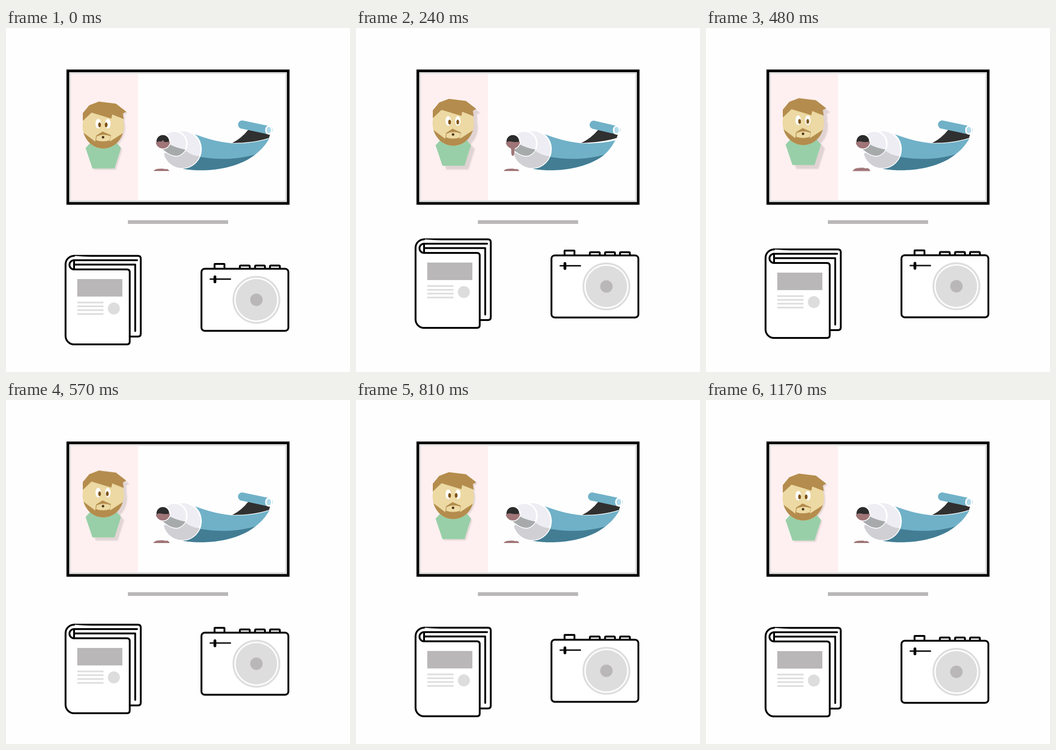
These frames come from a looping animation (748x748 px, 1.2 s). An HTML page without scripts:

```html
<!DOCTYPE html>
<html lang="en">
<head>
<meta charset="utf-8">
<title>Screen, book and camera</title>
<style>
  html, body { margin: 0; width: 100%; height: 100%; overflow: hidden; background: #fefefe; }
  svg { display: block; width: 100%; height: 100%; }

  .ink { fill: #fff; stroke: #000; stroke-width: 4; stroke-linecap: round; stroke-linejoin: round; }
  .line { fill: none; }
  .mid { fill: #b9b7b7; }
  .pale { fill: #dedddd; }
  .edge { stroke: #fff; stroke-width: 3.5; }
  .hair { fill: #b48c4d; }
  .skin { fill: #ecd9a3; }
  .paste { fill: #a07577; }

  .hop, .bob, .cast, .look, .tail, .dark, .roll, .cap, .drop, .neck, .splat {
    animation: 1.2s linear infinite;
  }
  .hop { animation-name: hop; }
  .late { animation-delay: .12s; animation-fill-mode: backwards; }
  .bob { animation-name: bob; }
  .cast { animation-name: cast; }
  .look { animation-name: look; }
  .tail { animation-name: tail; }
  .dark { animation-name: dark; }
  .roll { animation-name: roll; }
  .cap { animation-name: cap; }
  .drop { animation-name: drop; transform-box: fill-box; transform-origin: center; }
  .neck { animation-name: neck; transform-origin: 341px 256px; }
  .splat { animation-name: splat; transform-origin: 338px 311px; }

  @keyframes hop {
    0% { transform: none; animation-timing-function: ease; }
    20% { transform: translateY(-36px); animation-timing-function: cubic-bezier(.35, .1, .2, 1); }
    75%, 100% { transform: none; }
  }
  @keyframes bob {
    0%, 97.5%, 100% { transform: none; }
    10% { transform: translateY(-3.7px); }
    20% { transform: translateY(-6px); }
    30% { transform: translateY(-7.2px); }
    40% { transform: translateY(-7.5px); }
    48% { transform: translateY(-6.7px); }
    57.5% { transform: translateY(-5px); }
    77.5% { transform: translateY(-1.2px); }
    88% { transform: translateY(-.3px); }
  }
  @keyframes cast {
    0%, 65%, 100% { transform: translate(3px, 3px); opacity: .1; }
    9%, 43% { transform: translate(8.5px, 8.5px); opacity: .12; }
    57% { transform: translate(4px, 4px); opacity: .1; }
  }
  @keyframes look {
    0%, 58%, 100% { transform: none; }
    9%, 43% { transform: translateX(3.5px); }
  }
  @keyframes tail {
    0%, 36%, 100% { d: path("M405 229C440 242 474 252 508 251C535 250 556 246 573 240C562 258 553 267 538 278C500 306 435 315 384 306Z"); }
    7%, 26% { d: path("M405 229C440 242 474 252 508 251C532 250 549 248 564 244C556 258 550 267 538 277C500 306 435 315 384 306Z"); }
  }
  @keyframes dark {
    0%, 36%, 100% { d: path("M527 221L574 232L572 239C548 247 520 250 492 250Q512 240 527 221Z"); }
    7%, 26% { d: path("M527 221L569 232L567 239C545 246 518 249 490 250Q511 240 527 221Z"); }
  }
  @keyframes roll {
    0%, 36%, 100% { d: path("M513.5 210L571 222"); }
    7%, 26% { d: path("M517 210.5L566 222"); }
  }
  @keyframes cap {
    0%, 36%, 100% { transform: none; }
    7%, 26% { transform: translateX(-5px); }
  }
  @keyframes drop {
    0% { transform: translateY(-18px); opacity: 1; }
    10% { transform: translateY(-8px) scale(1.6, .8); }
    20% { transform: none; animation-timing-function: ease-in; }
    31% { transform: translateY(36px) scale(1, .7); opacity: 1; }
    31.1%, 100% { transform: translateY(36px) scale(1, .7); opacity: 0; }
  }
  @keyframes neck {
    0%, 27%, 100% { transform: scaleY(0); }
    10%, 21% { transform: none; }
  }
  @keyframes splat {
    0%, 30%, 52%, 100% { transform: none; }
    34%, 41% { transform: scale(1.14, 1.4); }
  }
</style>
</head>
<body>
<svg viewBox="0 0 748 748" xmlns="http://www.w3.org/2000/svg">
  <defs>
    <path id="torso" d="M173 261L184 249H240L250 261L236 305.500H188Z"/>
    <ellipse id="face" cx="211.500" cy="213" rx="45" ry="49"/>
    <path id="hair" d="M167 202V185L181 168L202 160L239 164.500L261.500 182L254 186L256 198L231 188L229 197L186 184Z"/>
    <g id="figure"><use href="#torso"/><use href="#face"/><use href="#hair"/></g>
    <circle id="shoulder" cx="383" cy="263.500" r="41"/>
    <path id="spout" d="M333 237C345 231 356 224 365 224A27.500 27.500 0 0 1 376 277C364 281 350 272 336 260Z"/>
    <circle id="mouth" cx="341" cy="246.500" r="15.500"/>
    <clipPath id="in-face"><use href="#face"/></clipPath>
    <clipPath id="in-shoulder"><use href="#shoulder"/></clipPath>
    <clipPath id="in-spout"><use href="#spout"/></clipPath>
    <clipPath id="in-mouth"><use href="#mouth"/></clipPath>
    <clipPath id="in-tail"><path class="tail" d="M405 229C440 242 474 252 508 251C535 250 556 246 573 240C562 258 553 267 538 278C500 306 435 315 384 306Z"/></clipPath>
    <filter id="soft" x="-20%" y="-20%" width="140%" height="140%"><feGaussianBlur stdDeviation="1.300"/></filter>
  </defs>
  <rect width="748" height="748" fill="#fefefe"/>

  <!-- Screen -->
  <rect x="134.500" y="93.300" width="479" height="288" fill="#fefefe" stroke="#000" stroke-width="6"/>
  <rect x="139.500" y="98" width="469.500" height="278.500" fill="none" stroke="#dedddd" stroke-width="3.500"/>
  <rect x="141" y="99.500" width="146" height="275" fill="#fef0f0"/>
  <rect class="mid" x="265" y="418" width="218" height="8"/>

  <!-- Man -->
  <g class="bob">
    <g class="cast"><use href="#figure" filter="url(#soft)"/></g>
    <use href="#torso" fill="#98cfa8"/>
    <use href="#face" class="skin"/>
    <path class="hair" clip-path="url(#in-face)" d="M165 225L194 247L196 234L210 225L228 233L226 247L258 226V265H165Z"/>
    <path class="skin" d="M197 236Q211 229 227 235L226 244Q211 249 196 244Z"/>
    <use href="#hair" class="hair"/>
    <g fill="#fff"><ellipse cx="200.500" cy="208" rx="6" ry="10.500"/><ellipse cx="221.500" cy="208" rx="6" ry="10.500"/></g>
    <g fill="#7d5314">
      <ellipse cx="203.500" cy="210.500" rx="3" ry="5.300"/>
      <ellipse class="look" cx="217.800" cy="210.500" rx="3" ry="5.300"/>
    </g>
    <circle cx="211" cy="237.500" r="2.700" fill="#4e3218"/>
  </g>

  <!-- Tube -->
  <path class="dark" d="M527 221L574 232L572 239C548 247 520 250 492 250Q512 240 527 221Z" fill="#303030"/>
  <g clip-path="url(#in-tail)">
    <path d="M380 220H580V315H380Z" fill="#70b1c8"/>
    <path d="M380 270C430 286 490 291 545 274V315H380Z" fill="#427d94"/>
  </g>
  <path class="roll" d="M513.500 210L571 222" fill="none" stroke="#70b1c8" stroke-width="18" stroke-linecap="round"/>
  <ellipse class="cap" cx="571.500" cy="222" rx="6.500" ry="8.500" fill="#b2dbea" stroke="#fff" stroke-width="3" transform-origin="571 222"/>
  <use href="#shoulder" class="edge" fill="#ededf3"/>
  <path clip-path="url(#in-shoulder)" d="M340 274L385 262Q402 279 426 279V306H340Z" fill="#d0cfd4"/>
  <use href="#spout" class="edge" fill="#ededf3"/>
  <path clip-path="url(#in-spout)" d="M335 246L354 252Q372 262 394 265V282H335Z" fill="#a7aaab"/>
  <use href="#mouth" class="edge" fill="#2d2c2d"/>
  <path class="paste" clip-path="url(#in-mouth)" d="M325 250Q331 245 338 247T357 247V264H325Z"/>
  <path class="paste neck" d="M331 256Q338 260 338 268H344Q344 260 351 256Z"/>
  <ellipse class="paste drop" cx="341" cy="270" rx="3.500" ry="8"/>
  <path class="paste splat" d="M321 311Q324 306 334 306Q342 305 346 307Q352 305 355 311Z"/>

  <!-- Book -->
  <g class="hop">
    <path class="ink" d="M148 495.500H287Q293 495.500 293 501.500V665Q293 671 287 671H148Z"/>
    <path class="ink" d="M148 495.500A18.500 18.500 0 0 0 129.500 514V669.500A18.500 18.500 0 0 0 148 688H263Q269 688 269 682V531Q269 525 263 525H148A10 10 0 0 1 148 505H285"/>
    <path class="ink line" d="M150 514.500H281V659"/>
    <rect class="mid" x="155" y="546" width="98" height="38"/>
    <path d="M155 597H212M155 605.300H212M155 613.600H212M155 622H212" stroke="#dedddd" stroke-width="3.500"/>
    <circle class="pale" cx="234.500" cy="610" r="13"/>
  </g>

  <!-- Camera -->
  <g class="hop late">
    <g class="ink">
      <rect x="453.500" y="513" width="21.500" height="12" rx="1"/>
      <rect x="508.500" y="516.500" width="21.500" height="9" rx="2"/>
      <rect x="541.500" y="516.500" width="21.500" height="9" rx="2"/>
      <rect x="574" y="516.500" width="21.500" height="9" rx="2"/>
      <rect x="425" y="523.500" width="189" height="135" rx="7"/>
      <path stroke-width="3" d="M444 546H488"/>
    </g>
    <path d="M454.300 541V552" stroke="#000" stroke-width="6" stroke-linecap="round"/>
    <circle cx="544.500" cy="591" r="50" fill="#fff" stroke="#dedddd" stroke-width="4"/>
    <circle class="pale" cx="544.500" cy="591" r="45"/>
    <circle class="mid" cx="544.500" cy="591" r="13.500"/>
  </g>
</svg>
</body>
</html>
```
